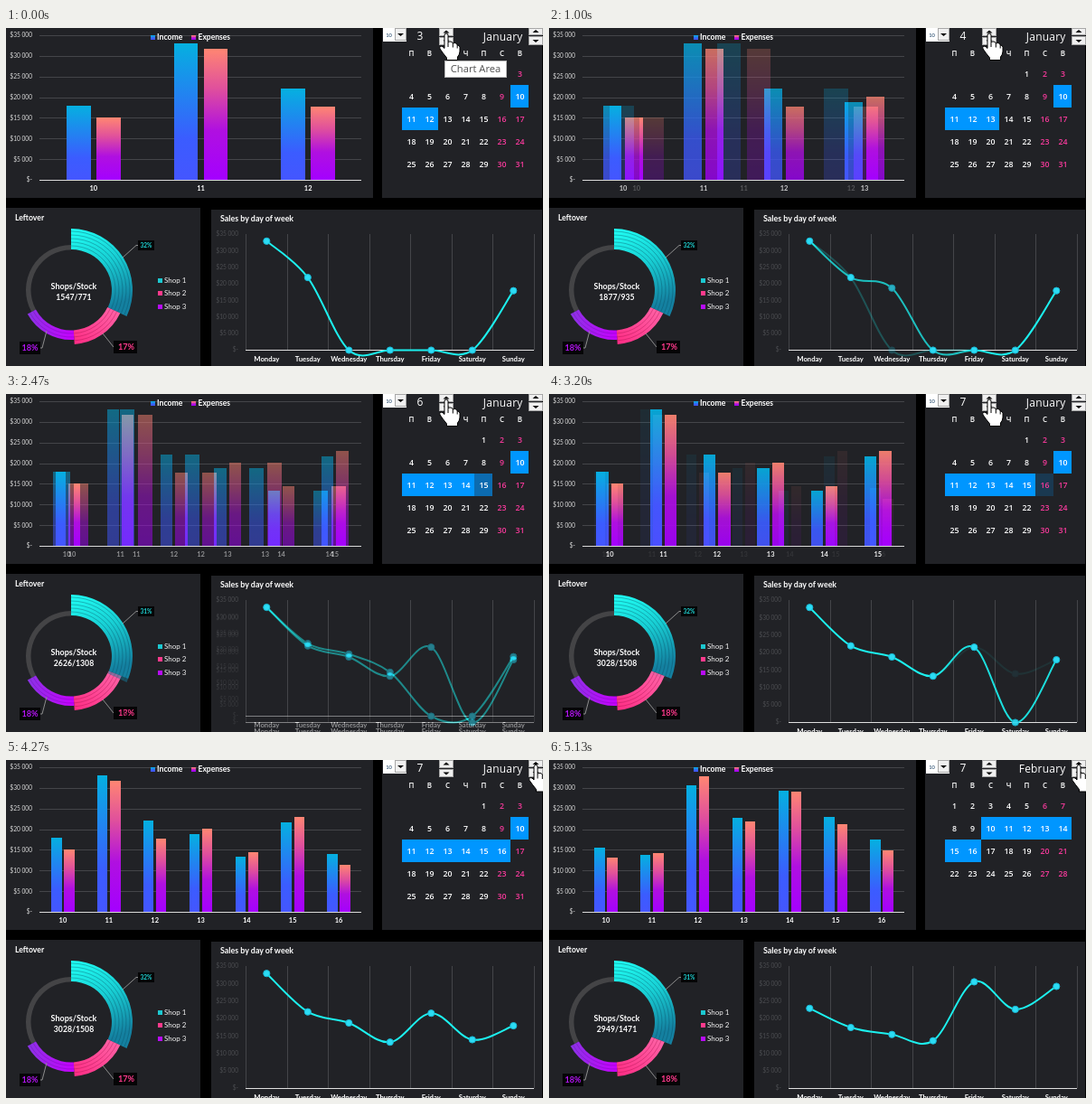
Recreate the animation shown at these times as an HTML page. Size 594 px wide and 374 px high, loop 5190 ms.

```html
<!DOCTYPE html>
<html lang="en">
<head>
<meta charset="utf-8">
<title>Dashboard</title>
<style>
html, body { margin: 0; width: 100%; height: 100%; overflow: hidden; background: #000; }
svg { display: block; position: absolute; left: 0; top: 0; overflow: hidden; }
text { white-space: pre; }
rect { shape-rendering: crispEdges; }
</style>
</head>
<body>
<svg id="stage" width="594" height="374" viewBox="0 0 594 374">
  <defs>
    <linearGradient id="income" x1="0" y1="0" x2="0" y2="1">
      <stop offset="0" stop-color="#05b0e0"/><stop offset=".7" stop-color="#3b5cff"/><stop offset="1" stop-color="#4456ff"/>
    </linearGradient>
    <linearGradient id="expense" x1="0" y1="0" x2="0" y2="1">
      <stop offset="0" stop-color="#ff8672"/><stop offset=".3" stop-color="#e0509c"/>
      <stop offset=".62" stop-color="#b010e0"/><stop offset="1" stop-color="#a400ff"/>
    </linearGradient>
    <linearGradient id="teal" x1="0" y1="0" x2=".3" y2="1">
      <stop offset="0" stop-color="#20fff4"/><stop offset=".5" stop-color="#18cfd4"/><stop offset="1" stop-color="#1480a0"/>
    </linearGradient>
    <linearGradient id="pink" x1="1" y1="0" x2="0" y2="1">
      <stop offset="0" stop-color="#ff66a8"/><stop offset="1" stop-color="#ff2c84"/>
    </linearGradient>
    <linearGradient id="purple" x1="0" y1="0" x2="1" y2="0">
      <stop offset="0" stop-color="#8a34e4"/><stop offset="1" stop-color="#c800ff"/>
    </linearGradient>
  </defs>
</svg>
<script>
const NS = 'http://www.w3.org/2000/svg';
const LOOP = 5190, FPS = 15;
const PANEL = '#212226', BLUE = '#0096ff', PINK = '#f83a9c';
const LATO = 'Lato, sans-serif', SANS = '"Open Sans", "Noto Sans", sans-serif';
const stage = document.getElementById('stage');

function add(parent, tag, attrs = {}) {
  const el = document.createElementNS(NS, tag);
  for (const k in attrs) el.setAttribute(k, attrs[k]);
  return parent.appendChild(el);
}
const group = parent => add(parent, 'g');
const rect = (g, x, y, width, height, fill, more) => add(g, 'rect', { x, y, width, height, fill, ...more });
const path = (g, d, more) => add(g, 'path', { d, fill: 'none', ...more });
function text(g, x, y, str, size, more) {
  const el = add(g, 'text', {
    x, y: y + size * .36, 'font-size': size, 'font-family': LATO,
    fill: '#fff', 'text-anchor': 'middle', ...more
  });
  el.textContent = str;
  return el;
}
const left = { 'text-anchor': 'start' }, right = { 'text-anchor': 'end' }, bold = { 'font-weight': 700 };
const clamp = v => Math.max(0, Math.min(1, v));
const money = i => i ? '$' + i * 5 + ' 000' : '$-';

// Daily [income, expenses] in thousands for the 10th to the 16th
const JAN = [[18, 15], [33, 31.7], [22, 17.7], [18.8, 20.1], [13.3, 14.4], [21.6, 23], [14, 11.3]];
const FEB = [[15.5, 13.2], [13.7, 14.2], [30.6, 32.8], [22.7, 21.9], [29.3, 29.1], [23, 21.2], [17.5, 14.8]];

// firstDay: index of the 10th in a week that starts on Monday
const january = (days, total, share) => ({ days, total, share, data: JAN, month: 'January', firstCol: 4, length: 31, firstDay: 6 });
const STATES = [
  january(3, '1547/771', [32, 17, 18]),
  january(4, '1877/935', [32, 17, 18]),
  january(5, '2088/1040', [32, 17, 18]),
  january(6, '2626/1308', [31, 18, 18]),
  january(7, '3028/1508', [32, 17, 18]),
  { days: 7, total: '2949/1471', share: [31, 18, 18], data: FEB, month: 'February', firstCol: 0, length: 28, firstDay: 2 }
];

// Change to the next state: start, chart fade window, calendar fade window
const CHANGES = [
  [600, 790, 1066, 640, 940],
  [1466, 1580, 1866, 1500, 1840],
  [2266, 2333, 2600, 2270, 2580],
  [3133, 3180, 3450, 3150, 3400],
  [4600, 4830, 5066, 4670, 5120]
];

// Pointer steps: time, x, y, shape
const POINTER = [
  [0, 487, 6, 'hand'], [3466, 523, 5, 'cross'], [3533, 546, 6, 'cross'], [3600, 566, 8, 'cross'],
  [3666, 576, 8, 'hand'], [3733, 587, 8, 'hand'], [3933, 587, 7, 'hand'], [4266, 586, 5.5, 'hand']
];

function barChart(g, { days, data }) {
  const x0 = 37.5, base = 168, unit = 160 / 35, step = 356 / days;
  rect(g, 0, 0, 406, 188, PANEL);
  for (let i = 0; i <= 7; i++) {
    const y = base - i * 5 * unit;
    rect(g, 37, Math.round(y), 356, 1, i ? '#444549' : '#d9d9d9');
    text(g, 29, y, money(i), 6.6, { ...right, fill: '#dcdcdc' });
  }
  const w = step * .224, gap = step * .056;
  for (let i = 0; i < days; i++) {
    const cx = x0 + step * (i + .5);
    data[i].forEach((v, k) => {
      const h = v * unit;
      rect(g, k ? cx + gap / 2 : cx - gap / 2 - w, base - h, w, h, k ? 'url(#expense)' : 'url(#income)');
    });
    text(g, cx, 177.5, 10 + i, 7.5, bold);
  }
  rect(g, 160, 8, 5, 5, 'url(#income)');
  text(g, 167, 10, 'Income', 8.7, { ...left, ...bold });
  rect(g, 205, 8, 5, 5, 'url(#expense)');
  text(g, 212.5, 10, 'Expenses', 8.5, { ...left, ...bold });
}

function polar(r, pct) {
  const a = pct / 50 * Math.PI;
  return (72 + r * Math.sin(a)).toFixed(2) + ' ' + (290 - r * Math.cos(a)).toFixed(2);
}
function ring(g, from, to, r0, r1, fill) {
  path(g, `M${polar(r1, from)}A${r1} ${r1} 0 0 1 ${polar(r1, to)}L${polar(r0, to)}A${r0} ${r0} 0 0 0 ${polar(r0, from)}Z`, { fill });
}
function grooves(g, from, to, r0, r1, stroke) {
  for (let r = r0; r < r1; r += 4)
    path(g, `M${polar(r, from)}A${r} ${r} 0 0 1 ${polar(r, to)}`, { stroke, 'stroke-width': .7 });
}

function donut(g, { share: [a, b, c] }) {
  rect(g, 0, 199, 215, 175, PANEL);
  text(g, 10, 209.5, 'Leftover', 8.7, { ...left, ...bold });
  ring(g, a + b + c, 100, 44.5, 50, '#444446');
  ring(g, 0, a, 45, 68, 'url(#teal)');
  grooves(g, 0, a, 49, 67, 'rgba(8,70,90,.5)');
  ring(g, a, a + b, 44.5, 60, 'url(#pink)');
  grooves(g, a, a + b, 48, 59, 'rgba(150,10,70,.5)');
  ring(g, a + b, a + b + c, 44.5, 55, 'url(#purple)');
  grooves(g, a + b, a + b + c, 48, 54, 'rgba(70,0,130,.35)');
  path(g, 'M129 254L144 240.5H147M107 338L119 353H122M45 335L40 354H37', { stroke: '#8c8c8c' });
  rect(g, 119, 346, 26, 14, '#050506');
  text(g, 133, 353, b + '%', 9.2, { ...bold, fill: '#ff3a8c' });
  rect(g, 15, 347, 23, 14, '#050506');
  text(g, 26.5, 354, c + '%', 9.2, { ...bold, fill: '#b414f4' });
  ['#1cc8d0', '#ff3a8c', '#b80cf8'].forEach((fill, i) => {
    const y = 279 + i * 14.6;
    rect(g, 168, y - 2.5, 5, 5, fill);
    text(g, 175, y, 'Shop ' + (i + 1), 8, { ...left, fill: '#f4f4f4' });
  });
}

function lineChart(g, { days, data, firstDay }) {
  const base = days < 6 ? 356 : 363, unit = (base - 228) / 35, step = 45.5;
  const names = ['Monday', 'Tuesday', 'Wednesday', 'Thursday', 'Friday', 'Saturday', 'Sunday'];
  rect(g, 227, 201, 366, 173, PANEL);
  text(g, 237, 210.5, 'Sales by day of week', 8.9, { ...left, ...bold });
  for (let i = 0; i <= 7; i++) {
    rect(g, Math.round(265 + i * step), 228, 1, base - 228, '#444549');
    text(g, 257, base - i * 5 * unit, money(i), 6.6, { ...right, fill: '#4c4d51' });
  }
  rect(g, 265, base, 319, 1, '#e0e0e0');
  const pts = names.map((name, i) => {
    const x = 288.3 + i * step, day = (i - firstDay + 7) % 7;
    text(g, x, base + 10.5, name, 7.7, bold);
    return [x, base + .5 - (day < days ? data[day][0] : 0) * unit];
  });
  let d = 'M' + pts[0];
  for (let i = 0; i < 6; i++) {
    const p = pts[Math.max(0, i - 1)], a = pts[i], b = pts[i + 1], n = pts[Math.min(6, i + 2)];
    const c1 = a.map((v, k) => v + (b[k] - p[k]) / 6);
    const c2 = b.map((v, k) => v - (n[k] - a[k]) / 6);
    d += `C${c1} ${c2} ${b}`;
  }
  path(g, d, { stroke: '#1cf0ee', 'stroke-width': 2 });
  for (const [cx, cy] of pts) add(g, 'circle', { cx, cy, r: 3.6, fill: '#2cdcf4', stroke: '#18b8d4' });
}

rect(stage, 0, 0, 594, 374, '#000');
const charts = STATES.map(s => {
  const g = group(stage);
  barChart(g, s);
  donut(g, s);
  lineChart(g, s);
  rect(g, 416, 0, 177, 188, PANEL);
  text(g, 571.5, 9.5, s.month, 12, { ...right, 'font-family': SANS, 'letter-spacing': .2 });
  return g;
});

// Values that switch at once
text(stage, 75, 286, 'Shops/Stock', 9, bold);
const total = text(stage, 75, 298, '', 8.7, bold);
rect(stage, 146, 235, 18, 11, '#050506');
const tealShare = text(stage, 155, 240.5, '', 6.6, { ...bold, fill: '#1fd8d8' });
const dayCount = text(stage, 458, 9, '', 12, { 'font-family': SANS });

// Calendar
[...'ПВСЧПСВ'].forEach((c, i) => text(stage, 448.5 + i * 20, 28.5, c, 8, { 'font-family': SANS, 'font-weight': 600 }));

function cellState(s, i) {
  const day = i - s.firstCol + 1, valid = day > 0 && day <= s.length;
  const on = valid && day >= 10 && day < 10 + s.days;
  return { str: valid ? String(day) : '', on, fill: i % 7 > 4 && !on ? PINK : '#fff' };
}
const marks = group(stage), labels = group(stage);
const cells = Array.from({ length: 35 }, (_, i) => {
  const x = 438 + i % 7 * 20, y = 38 + Math.floor(i / 7) * 25;
  const label = () => text(labels, x + 10.5, y + 12.8, '', 8.8, { 'font-family': SANS, 'font-weight': 600 });
  return {
    mark: rect(marks, x, y, 20, 25, BLUE),
    old: label(), now: label(), states: STATES.map(s => cellState(s, i))
  };
});

function setLabel(el, { str, fill }, opacity, dy) {
  el.textContent = str;
  el.setAttribute('fill', fill);
  el.setAttribute('opacity', opacity);
  el.setAttribute('transform', `translate(0 ${dy})`);
}
function drawCalendar(i, q) {
  for (const c of cells) {
    const now = c.states[i], old = c.states[Math.max(0, i - 1)];
    c.mark.setAttribute('opacity', old.on * (1 - q) + now.on * q);
    if (old.str === now.str) {
      setLabel(c.old, old, 0, 0);
      setLabel(c.now, q < .5 ? old : now, 1, 0);
    } else {
      const roll = old.str && now.str, shown = roll ? Math.min(1, q * 2.5) : q;
      setLabel(c.old, old, 1 - shown, roll ? q * 9 : 0);
      setLabel(c.now, now, shown, roll ? (q - 1) * 9 : 0);
    }
  }
}

// Form controls
function button(x, y, w, h, up) {
  rect(stage, x + .5, y + .5, w - 1, h - 1, '#f0f0f0', { stroke: '#a8a8a8' });
  const cx = x + w / 2, cy = y + h / 2, s = up ? -2 : 2;
  path(stage, `M${cx - 3.5} ${cy - s / 2}H${cx + 3.5}L${cx} ${cy + s}Z`, { fill: '#000' });
}
rect(stage, 417, 0, 26, 15, '#fff');
text(stage, 423.5, 8, '10', 5.8, { fill: '#123a60' });
button(430, 0, 13, 14, false);
button(479, 0, 16, 9, true);
button(479, 10, 16, 9, false);
button(578, 0, 16, 8, true);
button(578, 9, 16, 10, false);

const tip = group(stage);
rect(tip, 485.5, 36.5, 68, 18, '#fff', { stroke: '#b4b4b4' });
text(tip, 519.5, 45.3, 'Chart Area', 11.2, { 'font-family': SANS, fill: '#505050' });

const outline = { fill: '#fff', stroke: '#000', 'stroke-width': 1, 'stroke-linejoin': 'round' };
const shapes = { hand: group(stage), cross: group(stage) };
path(shapes.hand, 'M-2 2Q-2 0 0 0Q2 0 2 2V9.5Q4 8.5 6 9.3Q7 9.8 7.3 11Q9 10 11 11Q12 11.8 12.2 13Q15 12.8 15 15.5V20Q14.8 23.5 12.5 26V29.5H.5V27Q-4 21.5-7 17Q-8 14.5-6 14Q-4 13.8-2 16.5Z', outline);
path(shapes.hand, 'M2 9.5V15M7.3 11V15.5M12.2 13V16.5', { stroke: '#000' });
path(shapes.cross, 'M-2.5-7H2.5V-2.5H7V2.5H2.5V7H-2.5V2.5H-7V-2.5H-2.5Z', outline);

function draw(ms) {
  const t = Math.floor((ms + 5) * FPS / 1000) * 1000 / FPS;
  const i = CHANGES.filter(c => t >= c[0]).length;
  let p = 1, q = 1;
  if (i) {
    const [, c0, c1, q0, q1] = CHANGES[i - 1];
    p = clamp((t - c0) / (c1 - c0));
    q = clamp((t - q0) / (q1 - q0));
  }
  charts.forEach((g, k) => {
    const o = k === i ? p : k === i - 1 && p < 1 ? 1 : 0;
    g.setAttribute('opacity', o);
    g.setAttribute('display', o ? 'inline' : 'none');
  });
  const s = STATES[i];
  total.textContent = s.total;
  tealShare.textContent = s.share[0] + '%';
  dayCount.textContent = s.days;
  drawCalendar(i, q);
  tip.setAttribute('display', i ? 'none' : 'inline');
  const [, x, y, shape] = POINTER.filter(k => t >= k[0]).pop();
  for (const k in shapes) shapes[k].setAttribute('display', k === shape ? 'inline' : 'none');
  shapes[shape].setAttribute('transform', `translate(${x} ${y})`);
}

const start = performance.now();
function tick() {
  draw((performance.now() - start) % LOOP);
  requestAnimationFrame(tick);
}
tick();
</script>
</body>
</html>
```
